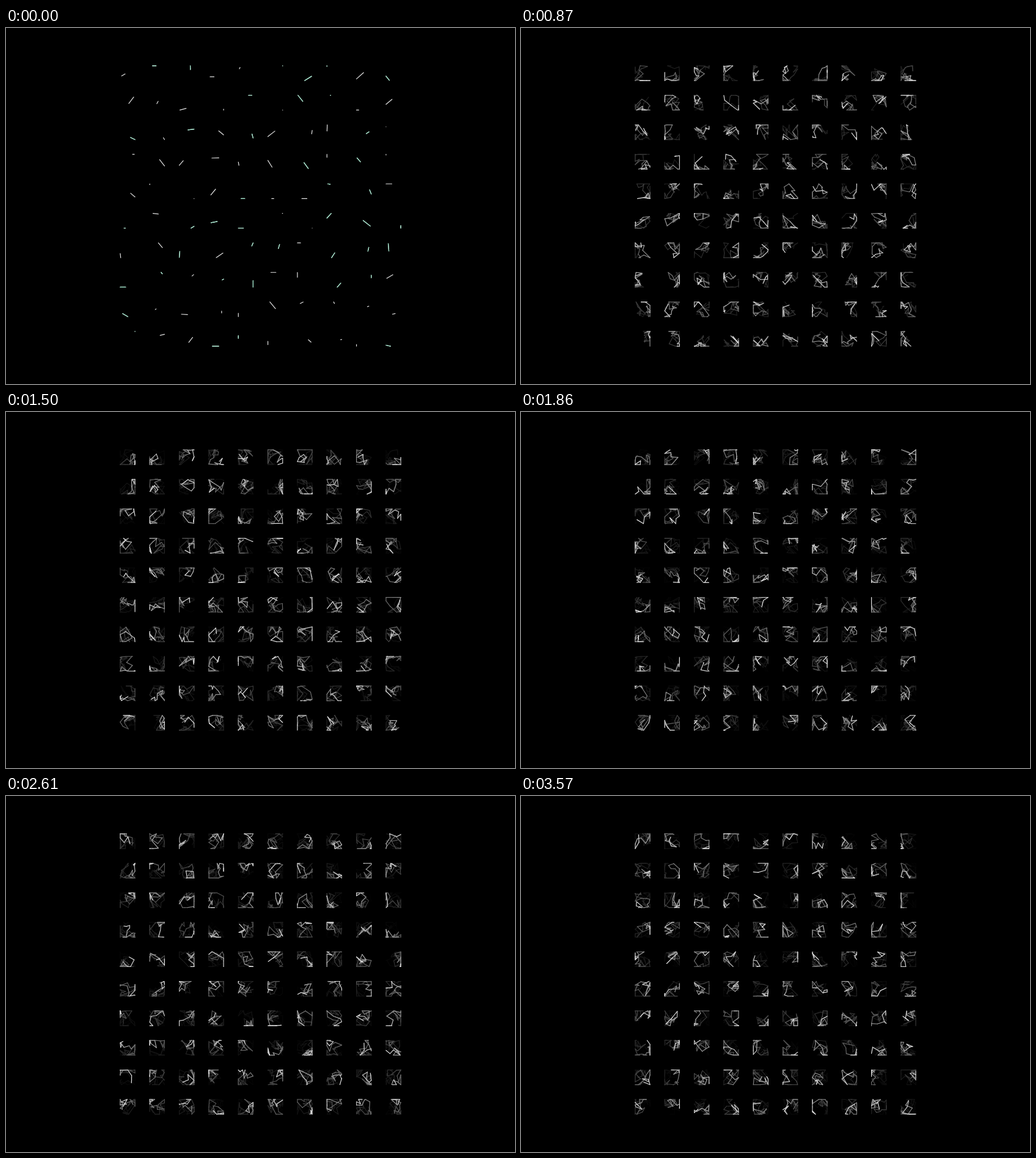
An HTML page that plays this animation: 833 px wide and 583 px high, repeating every 3600 ms.

```html
<!DOCTYPE html>
<html lang="en">
<head>
<meta charset="utf-8">
<title>Random walks</title>
<style>
  html, body { margin: 0; width: 100%; height: 100%; overflow: hidden; background: #000; }
  svg { display: block; width: 833px; height: 583px; }
  path { fill: none; stroke-width: 1.2; stroke-linecap: round; }
</style>
</head>
<body>
<svg id="stage" viewBox="0 0 833 583"></svg>
<script>
const STEP_MS = 30, STEPS = 120, GRID = 10, WARM_UP = 12;
const PITCH = 580 / 12, SIZE = PITCH / 2, REACH = SIZE / 2;
const SPAN = PITCH * (GRID - 0.5);
const LEFT = (833 - SPAN) / 2, TOP = (583 - SPAN) / 2;
const BRIGHT = 226, FADE = 0.93, MINT = 'rgb(158,232,204)';

let seed = 20177;
function random() {
  seed = (seed + 0x6D2B79F5) | 0;
  let v = Math.imul(seed ^ (seed >>> 15), seed | 1);
  v ^= v + Math.imul(v ^ (v >>> 7), v | 61);
  return ((v ^ (v >>> 14)) >>> 0) / 4294967296;
}

// One step of a walk that stops at the edges of its square.
const wander = v => Math.min(SIZE, Math.max(0, v + (random() * 2 - 1) * REACH));

const walkers = [];
for (let i = 0; i < GRID * GRID; i++) {
  walkers.push({
    left: LEFT + (i % GRID) * PITCH,
    top: TOP + Math.floor(i / GRID) * PITCH,
    x: random() * SIZE,
    y: random() * SIZE
  });
}

function advance(w) {
  const point = () => (w.left + w.x).toFixed(2) + ' ' + (w.top + w.y).toFixed(2);
  const from = point();
  w.x = wander(w.x);
  w.y = wander(w.y);
  return 'M' + from + 'L' + point();
}

const stage = document.getElementById('stage');
function addPath(lines) {
  const path = document.createElementNS('http://www.w3.org/2000/svg', 'path');
  path.setAttribute('d', lines.join(''));
  return stage.appendChild(path);
}

for (let i = 0; i < WARM_UP; i++) walkers.forEach(advance);

const steps = Array.from({ length: STEPS }, () => walkers.map(advance));
const layers = steps.map(addPath);

// Half of the lines that open the loop are mint.
const mint = addPath(steps[0].filter(() => random() < 0.5));
mint.style.stroke = MINT;

let shown = -1;
function draw(ms) {
  const now = Math.floor((ms % (STEP_MS * STEPS)) / STEP_MS);
  if (now === shown) return;
  shown = now;
  mint.style.display = now === 0 ? '' : 'none';
  layers.forEach((path, k) => {
    const level = k > now ? 0 : Math.round(BRIGHT * FADE ** (now - k));
    path.style.display = level > 3 ? '' : 'none';
    path.style.stroke = `rgb(${level},${level},${level})`;
  });
}

const start = performance.now();
function tick() {
  draw(performance.now() - start);
  requestAnimationFrame(tick);
}
tick();
</script>
</body>
</html>
```
